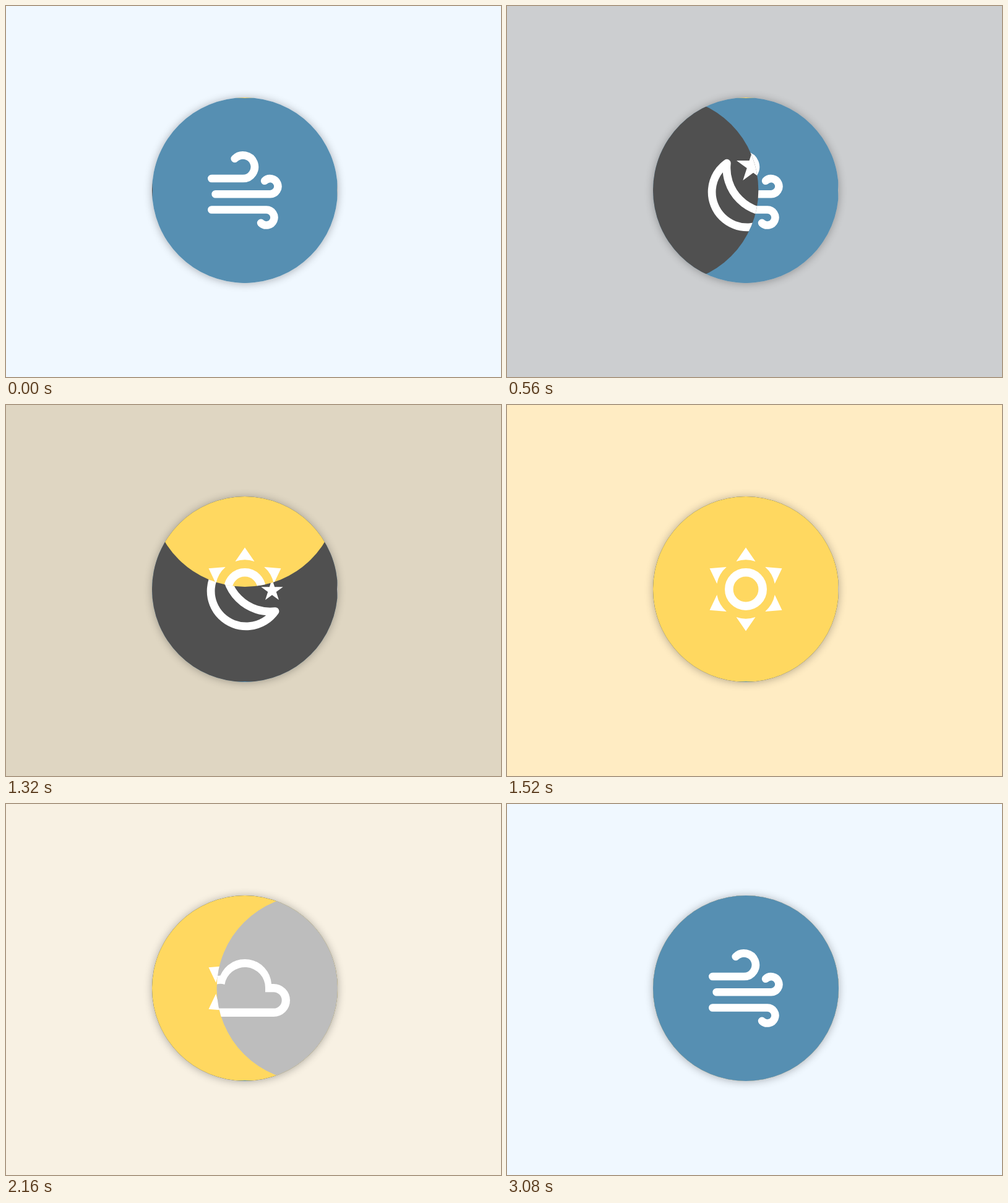
Recreate the animation shown at these times as an HTML page without scripts. Size 800x600 px, loop 3440 ms.

```html
<!DOCTYPE html>
<html lang="en">
<head>
<meta charset="utf-8">
<title>Weather discs</title>
<style>
  /* One clock counts 40 ms ticks; every layer derives its progress from it. */
  @property --tick { syntax: "<number>"; inherits: true; initial-value: 0; }
  @keyframes clock { from { --tick: 0; } to { --tick: 86; } }

  html, body { margin: 0; width: 100%; height: 100%; overflow: hidden; }
  .stage {
    position: absolute; inset: 0;
    animation: clock 3440ms steps(86) -1ms infinite;
  }

  /* --start: tick of the first move, --span: ticks it takes, --dx/--dy: side it enters from */
  .wind  { --disc: #568fb2; --air: #f0f8ff; --start: -20; --span: 9.4; --dx: 0; --dy: 0; }
  .night { --disc: #505050; --air: #c0c0c0; --start: 10; --span: 8.5; --dx: -1; --dy: 0; }
  .sun   { --disc: #ffd860; --air: #ffecc3; --start: 29; --span: 9.4; --dx: 0; --dy: -1; }
  .cloud { --disc: #bdbdbd; --air: #f5f5f5; --start: 49; --span: 9.4; --dx: 1; --dy: 0; }
  .again { --start: 68; --dy: 1; }
  .sky.night { --span: 7; }

  .sky, .disc svg {
    --x: clamp(0, (var(--tick) - var(--start) + .6) / var(--span), 1);
    --p: calc(.5 - .5 * cos(180deg * var(--x)));
    position: absolute; inset: 0;
  }
  .sky { background: var(--air); opacity: var(--p); }
  .disc {
    position: absolute; left: 236px; top: 148px;
    width: 300px; height: 300px;
    border-radius: 50%;
    overflow: hidden;
    box-shadow: 0 1px 14px rgba(0, 0, 0, .3);
  }
  .disc svg {
    --gap: calc(300px * (1 - var(--p)));
    width: 300px; height: 300px;
    background: var(--disc);
    clip-path: circle(151px at calc(150px + var(--dx) * var(--gap)) calc(150px + var(--dy) * var(--gap)));
  }
  .defs { position: absolute; width: 0; height: 0; }
  .line { fill: none; stroke: #fff; stroke-linecap: round; stroke-linejoin: round; }
</style>
</head>
<body>
<svg class="defs">
  <defs>
    <path id="gusts" class="line" stroke-width="12.6" d="M332.3 279H383a18.8 18.8 0 1 0-13.3-32.1
      M338.6 304.2H427a12.5 12.5 0 1 0-8.9-21.4
      M332.3 329.5H421a12.5 12.5 0 1 1-8.9 21.4"/>
    <path id="star" fill="#fff" d="M0-28.4 6.4-8.8H27L10.3 3.4 16.7 23 0 10.8-16.7 23-10.3 3.4-27-8.8H-6.4Z"/>
    <path id="ray" fill="#fff" d="M0-67.5 15.5-45A47.5 47.5 0 0 0-15.5-45Z"/>
    <g id="rays">
      <use href="#ray"/>
      <use href="#ray" transform="rotate(120)"/>
      <use href="#ray" transform="rotate(240)"/>
    </g>
  </defs>
</svg>

<div class="stage">
  <div class="sky wind"></div>
  <div class="sky night"></div>
  <div class="sky sun"></div>
  <div class="sky cloud"></div>
  <div class="sky wind again"></div>

  <div class="disc">
    <svg class="wind" viewBox="236 148 300 300"><use href="#gusts"/></svg>

    <svg class="night" viewBox="236 148 300 300">
      <path class="line" stroke-width="12.8" d="M355.3 254.2A57.1 57.1 0 1 0 435 333.6A72 72 0 0 1 355.3 254.2Z"/>
      <use href="#star" transform="translate(398 258.9)"/>
      <use href="#star" transform="translate(430 300.1) scale(.655)"/>
    </svg>

    <svg class="sun" viewBox="236 148 300 300">
      <g transform="translate(386 298)">
        <circle class="line" r="27.2" stroke-width="13.6"/>
        <use href="#rays"/>
        <use href="#rays" transform="scale(1 -1)"/>
      </g>
    </svg>

    <svg class="cloud" viewBox="236 148 300 300">
      <path fill="#fff" fill-rule="evenodd" d="M346.3 344A33.2 33.2 0 0 1 346.3 277.6A43 43 0 0 1 429 291H432.5A26.5 26.5 0 0 1 432.5 344Z
        M346.3 330.6A19.9 19.9 0 0 1 346.3 290.8Q350 290.8 353.4 291.9A33 33 0 0 1 419 297.4V304.2H432.5A13.2 13.2 0 0 1 432.5 330.6Z"/>
    </svg>

    <svg class="wind again" viewBox="236 148 300 300"><use href="#gusts"/></svg>
  </div>
</div>
</body>
</html>
```
